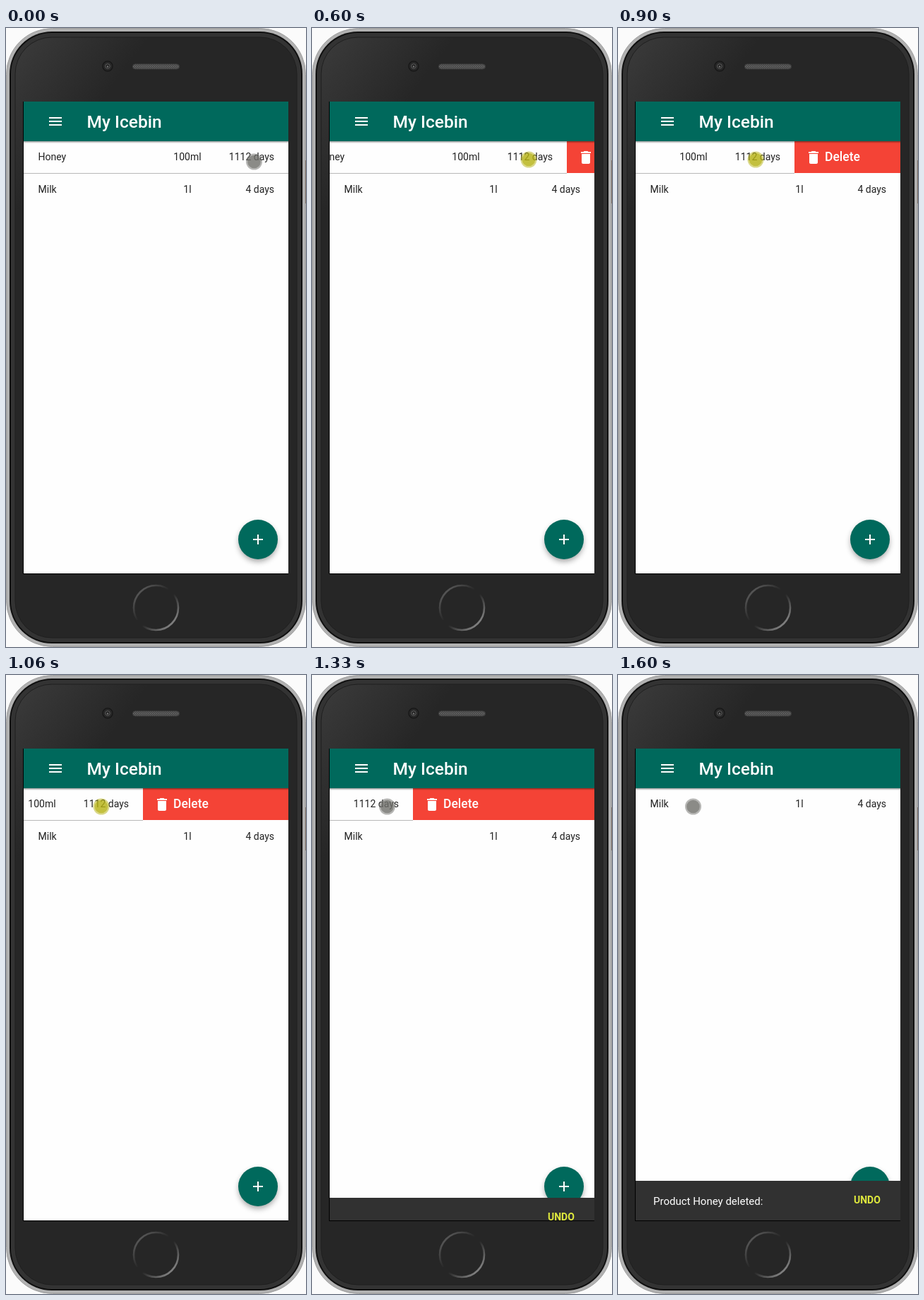
An HTML page that plays this animation: 425x875 px, repeating every 2480 ms.

```html
<!DOCTYPE html>
<html lang="en">
<head>
<meta charset="utf-8">
<title>Swipe to delete</title>
<style>
  html, body { margin: 0; width: 100%; height: 100%; overflow: hidden; background: #fbfbfb; }
  svg { display: block; width: 425px; height: 875px; font-family: Roboto, sans-serif; }
  .row { font-size: 14px; fill: #222; }
  .mid { text-anchor: middle; }
  .end { text-anchor: end; }
</style>
</head>
<body>
<svg viewBox="0 0 425 875" xmlns="http://www.w3.org/2000/svg">
  <defs>
    <linearGradient id="body" gradientUnits="userSpaceOnUse" x1="10" y1="20" x2="130" y2="110">
      <stop offset="0" stop-color="#3b3b3b"/><stop offset="1" stop-color="#262626"/>
    </linearGradient>
    <linearGradient id="home" x1=".12" y1=".12" x2=".88" y2=".88">
      <stop offset="0" stop-color="#585858"/><stop offset=".42" stop-color="#262626"/>
      <stop offset=".56" stop-color="#262626"/><stop offset="1" stop-color="#858585"/>
    </linearGradient>
    <linearGradient id="fade" x1="0" y1="0" x2="0" y2="1">
      <stop offset="0" stop-opacity=".4"/><stop offset="1" stop-opacity="0"/>
    </linearGradient>
    <pattern id="mesh" width="3" height="3" patternUnits="userSpaceOnUse">
      <rect width="3" height="3" fill="#4a4a4a"/>
      <path d="M0 0h1v1h-1zM1.5 1.5h1v1h-1z" fill="#707070"/>
    </pattern>
    <filter id="soft" x="-40%" y="-40%" width="180%" height="190%"><feGaussianBlur stdDeviation="4"/></filter>
    <clipPath id="screen"><rect x="25" y="104" width="375" height="667"/></clipPath>
  </defs>

  <!-- phone -->
  <rect width="425" height="875" fill="#fbfbfb"/>
  <rect x=".5" y=".5" width="424" height="874" rx="65" fill="#b1b1b1" stroke="#9c9c9c"/>
  <rect x="5" y="5" width="415" height="865" rx="60" fill="#101010"/>
  <rect x="7" y="7" width="411" height="861" rx="58" fill="#333"/>
  <rect x="13" y="13" width="399" height="849" rx="52" fill="url(#body)" stroke="#1f1f1f"/>
  <rect x="424" y="187" width="1" height="61" fill="#75685f"/>
  <circle cx="144" cy="54" r="7" fill="#292929" stroke="#181818" stroke-width="1.5"/>
  <circle cx="144" cy="54" r="3.2" fill="#1c1c1c" stroke="#606060"/>
  <circle cx="144" cy="54.5" r="1.2" fill="#777"/>
  <rect x="179.5" y="51" width="66" height="7" rx="3.5" fill="url(#mesh)" stroke="#3c3c3c"/>
  <circle cx="212.5" cy="819.5" r="31.5" fill="none" stroke="url(#home)" stroke-width="2.6"/>
  <rect x="24" y="104" width="376" height="668" fill="#000"/>

  <!-- app -->
  <g clip-path="url(#screen)">
    <rect x="25" y="104" width="375" height="667" fill="#fefefe"/>
    <g id="swipe">
      <rect id="red" y="160" width="400" height="45" fill="#f44336"/>
      <g id="honey" class="row">
        <rect x="25" y="160" width="375" height="46" fill="#fefefe"/>
        <rect x="25" y="205" width="375" height="1" fill="#b9b9b9"/>
        <text x="45.5" y="187">Honey</text>
        <text x="257" y="187" class="mid">100ml</text>
        <text x="380" y="187" class="end">1112 days</text>
      </g>
      <g id="action" fill="#fff">
        <path transform="translate(15 171)" d="M6 19c0 1.1.9 2 2 2h8c1.1 0 2-.9 2-2V7H6v12zM19 4h-3.5l-1-1h-5l-1 1H5v2h14V4z"/>
        <text x="43" y="188" font-size="17.5" font-weight="500">Delete</text>
      </g>
    </g>
    <g id="milk" class="row">
      <text x="45.5" y="233">Milk</text>
      <text x="257" y="233" class="mid">1l</text>
      <text x="380" y="233" class="end">4 days</text>
    </g>

    <rect x="25" y="160" width="375" height="3" fill="url(#fade)"/>
    <rect x="25" y="104" width="375" height="56" fill="#00695c"/>
    <path d="M61 126h18v2h-18zM61 131h18v2h-18zM61 136h18v2h-18z" fill="#fff"/>
    <text x="114.5" y="141" font-size="24.5" font-weight="500" fill="#fff">My Icebin</text>

    <circle cx="357" cy="727" r="27" opacity=".38" filter="url(#soft)"/>
    <circle cx="357" cy="723" r="28" fill="#00695c"/>
    <path d="M350 722h6v-6h2v6h6v2h-6v6h-2v-6h-6z" fill="#fff"/>

    <g id="toast">
      <rect x="25" y="715" width="375" height="56" fill="#313131"/>
      <text id="note" x="50" y="749" font-size="15" fill="#fff">Product Honey deleted:</text>
      <text x="334" y="747" font-size="14" font-weight="700" fill="#dfe93d">UNDO</text>
    </g>
  </g>

  <g id="touch">
    <circle r="11.5" opacity=".5"/>
    <circle r="9.3" opacity=".62"/>
  </g>
</svg>
<script>
  const LOOP = 2480, EDGE = 400;
  const STEPS = [0, 70, 140, 220, 290, 370, 440, 520, 600, 670, 750, 820, 900, 980,
    1060, 1130, 1200, 1280, 1330, 1380, 1490, 1600];
  const PRESS = 220, RELEASE = 1200, REMOVED = 1380, TOAST = 1245;

  // [time, value] points
  const DRAG = [[370, 0], [520, 15], [600, 39], [900, 150], [1060, 206], [1200, 238], [1330, 257]];
  const TOUCH_X = [[0, 351.5], [290, 348], [400, 346], [520, 330], [600, 307], [900, 195],
    [1060, 135], [1200, 110], [1280, 106.5]];
  const TOUCH_Y = [[0, 189], [290, 187.5], [600, 186]];

  const el = id => document.getElementById(id);
  const move = (id, x, y) => el(id).setAttribute('transform', `translate(${x} ${y})`);
  const show = (id, on) => el(id).setAttribute('visibility', on ? 'visible' : 'hidden');

  function at(keys, t) {
    if (t <= keys[0][0]) return keys[0][1];
    for (let i = 1; i < keys.length; i++) {
      const [t0, a] = keys[i - 1], [t1, b] = keys[i];
      if (t <= t1) return a + (b - a) * (t - t0) / (t1 - t0);
    }
    return keys[keys.length - 1][1];
  }

  // cubic-bezier(.36, .66, .04, 1)
  function ease(p) {
    if (p <= 0) return 0;
    if (p >= 1) return 1;
    const curve = (s, a, b) => 3 * (1 - s) * (1 - s) * s * a + 3 * (1 - s) * s * s * b + s * s * s;
    let lo = 0, hi = 1;
    for (let i = 0; i < 20; i++) {
      const s = (lo + hi) / 2;
      if (curve(s, .36, .04) < p) lo = s; else hi = s;
    }
    return curve(lo, .66, 1);
  }

  function draw(time) {
    const now = time % LOOP;
    const t = STEPS.filter(s => s <= now).pop();
    const drag = Math.round(at(DRAG, t));

    show('swipe', t < REMOVED);
    move('honey', -drag, 0);
    move('red', EDGE - drag, 0);
    move('action', EDGE - drag, 0);
    move('milk', 0, t < REMOVED ? 0 : -46);

    move('toast', 0, Math.round(56 * (1 - ease((t - TOAST) / 400))));
    show('note', t >= REMOVED);

    move('touch', at(TOUCH_X, t), at(TOUCH_Y, t));
    el('touch').setAttribute('fill', t >= PRESS && t < RELEASE ? '#b5b212' : '#6f6f6b');
  }

  function tick() {
    draw(performance.now());
    requestAnimationFrame(tick);
  }
  tick();
</script>
</body>
</html>
```
